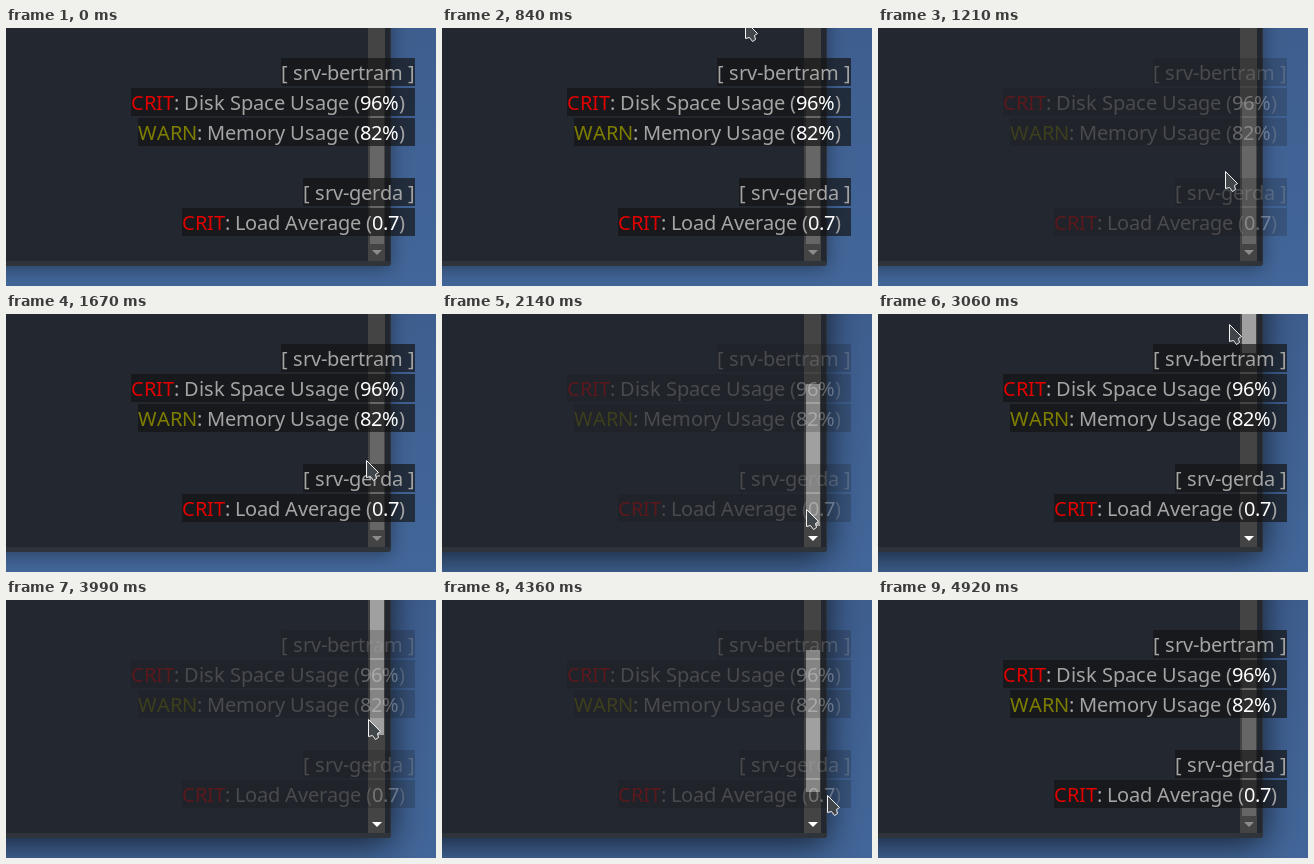
Recreate the animation shown at these times as an HTML page with a canvas. Size 430x258 px, loop 6030 ms.

```html
<!DOCTYPE html>
<html lang="en">
<head>
<meta charset="utf-8">
<title>Status overlay</title>
<style>
  html, body { margin: 0; width: 100%; height: 100%; overflow: hidden; background: #41629a; }
  canvas { display: block; width: 430px; height: 258px; }
</style>
</head>
<body>
<canvas id="stage" width="430" height="258"></canvas>
<script>
const ctx = document.getElementById('stage').getContext('2d');
const W = 430, H = 258, LOOP = 6030;
const START = 840, STEP = 650 / 7, LAST = 44;
const GREY = '#a4a4a4', RED = '#e00000', OLIVE = '#7d7d00', WHITE = '#fff';
const RIGHT = 409, ROW_H = 28, ROW_STEP = 30;
const THUMB_H = 142, THUMB_END = 216, GRAB = 22;
const GRAB_STEP = 14, RELEASE_STEP = 43;

const host = name => [[`[ ${name} ]`, GREY]];
const alarm = (level, color, label, value) =>
  [[level, color], [`: ${label} (`, GREY], [value, WHITE], [')  ', GREY]];

const rows = [
  host('srv-bertram'),
  alarm('CRIT', RED, 'Disk Space Usage', '96%'),
  alarm('WARN', OLIVE, 'Memory Usage', '82%'),
  null,
  host('srv-gerda'),
  alarm('CRIT', RED, 'Load Average', '0.7')
];
const rowTop = i => ROW_STEP * (i + 1);

// Pointer strokes, eased from one stop to the next
const stops = [
  { k: 0, x: 303, y: -7 },
  { k: 6, x: 363, y: 196 },
  { k: 8, x: 360, y: 146 },
  { k: 9, x: 360, y: 146 },
  { k: 14, x: 364, y: 195 },
  { k: 17, x: 354, y: 106 },
  { k: 18, x: 353, y: 99 },
  { k: 24, x: 351, y: 10 },
  { k: 27, x: 351, y: 3 },
  { k: 34, x: 362, y: 119 },
  { k: 40, x: 393, y: 221 }
];

function pointer(k) {
  if (k < 0 || k >= LAST) return null;
  const i = stops.findIndex(s => s.k > k);
  if (i < 0) return stops[stops.length - 1];
  const a = stops[i - 1], b = stops[i];
  const f = (k - a.k) / (b.k - a.k);
  const e = f * f * (3 - 2 * f);
  return { x: a.x + (b.x - a.x) * e, y: a.y + (b.y - a.y) * e };
}

// Steps fall on multiples of 10 ms.
function stepAt(t) {
  let k = -1;
  while (k < LAST && t >= START + Math.floor((k + 1) * STEP / 10) * 10) k++;
  return k;
}

function box(x, y, w, h, fill) {
  ctx.fillStyle = fill;
  ctx.fillRect(x, y, w, h);
}

function poly(points, fill, stroke) {
  ctx.beginPath();
  points.forEach(([x, y]) => ctx.lineTo(x, y));
  ctx.closePath();
  ctx.fillStyle = fill;
  ctx.fill();
  if (stroke) {
    ctx.strokeStyle = stroke;
    ctx.lineWidth = 1;
    ctx.lineJoin = 'round';
    ctx.stroke();
  }
}

function drawDesktop() {
  const g = ctx.createLinearGradient(0, 0, 0, H);
  g.addColorStop(0, '#3e5e8f');
  g.addColorStop(1, '#426699');
  box(0, 0, W, H, g);
}

function drawWindow(active) {
  ctx.save();
  ctx.shadowColor = active ? 'rgba(0,0,0,.7)' : 'rgba(0,0,0,.4)';
  ctx.shadowBlur = active ? 34 : 18;
  ctx.shadowOffsetY = active ? 5 : 2;
  ctx.beginPath();
  ctx.roundRect(-60, -60, 445, 298, 3);
  ctx.fillStyle = '#2f333a';
  ctx.fill();
  ctx.restore();
  box(0, 0, 384, 233, '#23272f');
}

function drawScrollbar(bottom, bright) {
  box(362, 0, 17, 233, '#444444');
  box(364, bottom - THUMB_H, 14, THUMB_H, bright ? '#a0a0a0' : '#666666');
  poly([[366, 222], [376, 222], [371, 227]], bottom < THUMB_END ? '#fff' : '#8c8c8c');
}

// Glyphs advance by whole pixels.
const advance = ch => Math.round(ctx.measureText(ch).width);
const sum = list => list.reduce((a, b) => a + b, 0);

function drawRow(parts, y) {
  const width = sum(parts.map(([s]) => sum([...s].map(advance))));
  let x = RIGHT - width;
  box(x, y, width, ROW_H, 'rgba(20,20,20,.68)');
  for (const [s, color] of parts) {
    ctx.fillStyle = color;
    for (const ch of s) {
      ctx.fillText(ch, x, y + 22);
      x += advance(ch);
    }
  }
}

function drawOverlay(dimmed) {
  ctx.save();
  ctx.globalAlpha = dimmed ? 0.3 : 1;
  ctx.font = '20px "Noto Sans", sans-serif';
  rows.forEach((parts, i) => parts && drawRow(parts, rowTop(i)));
  ctx.restore();
}

function drawPointer({ x, y }) {
  ctx.save();
  ctx.translate(Math.round(x) + 0.5, Math.round(y) + 0.5);
  poly([[0, 0], [0, 17], [4, 16], [7, 20], [10, 18], [9, 14], [12, 12]], '#41464b', '#f4f4f4');
  ctx.restore();
}

function draw(t) {
  const k = stepAt(t);
  const now = pointer(k), before = pointer(k - 1);
  const held = k >= GRAB_STEP && k < RELEASE_STEP;
  // The overlay and the thumb trail the pointer by one step.
  const bottom = held ? Math.min(THUMB_END, before.y + GRAB) : THUMB_END;
  const over = (parts, i) => parts && before.y >= rowTop(i) && before.y < rowTop(i) + ROW_H;
  const hovered = now && before && rows.some(over);

  drawDesktop();
  drawWindow(k >= GRAB_STEP);
  drawScrollbar(Math.round(bottom), held);
  drawOverlay(hovered);
  if (now) drawPointer(now);
}

const begin = performance.now();
function tick() {
  draw((performance.now() - begin) % LOOP);
  requestAnimationFrame(tick);
}
tick();
</script>
</body>
</html>
```
